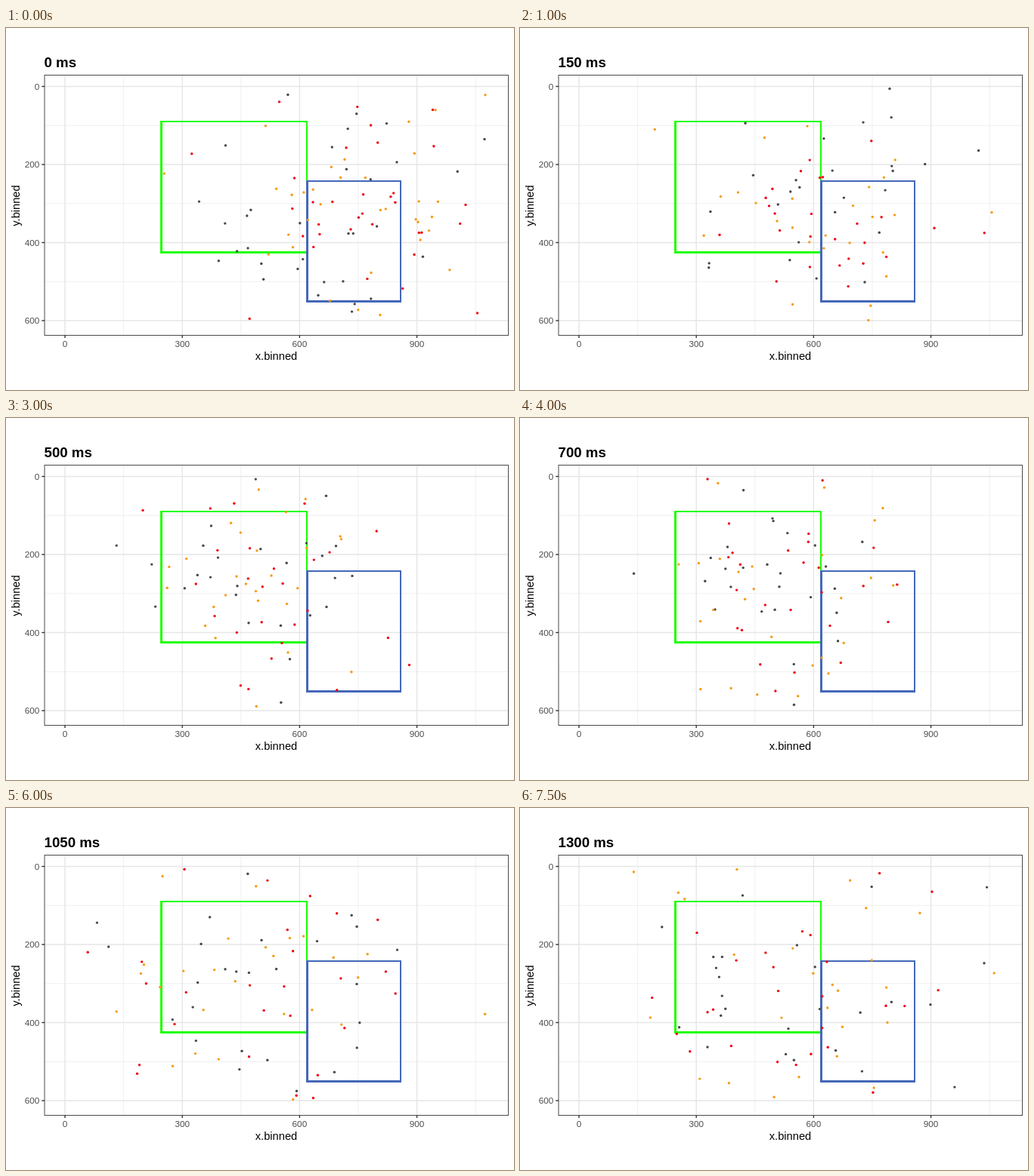
Write an HTML page that moves like this. It is 672x480 px and loops after 8000 ms.

```html
<!DOCTYPE html>
<html lang="en">
<head>
<meta charset="utf-8">
<title>Binned positions over time</title>
<style>
  html, body { margin: 0; width: 100%; height: 100%; overflow: hidden; background: #fff; }
  svg { display: block; font-family: "Liberation Sans", Arial, sans-serif; }
</style>
</head>
<body>
<svg id="plot" width="672" height="480" viewBox="0 0 672 480"></svg>
<script>
const svg = document.getElementById('plot');
const STEPS = 16, STEP_MS = 500;
const PANEL = { left: 51, top: 62.5, right: 664.5, bottom: 407.5 };
const px = v => 78 + v * 0.5173;
const py = v => 77.5 + v * 0.5175;

function make(tag, attrs, text) {
  const el = document.createElementNS('http://www.w3.org/2000/svg', tag);
  for (const key in attrs) el.setAttribute(key, attrs[key]);
  if (text !== undefined) el.textContent = text;
  return svg.appendChild(el);
}

function line(x1, y1, x2, y2, stroke, width) {
  make('line', { x1, y1, x2, y2, stroke, 'stroke-width': width });
}

function label(x, y, size, fill, anchor, text, more) {
  return make('text', { x, y, fill, 'font-size': size, 'text-anchor': anchor, ...more }, text);
}

// Grid
const vertical = (v, color, w) => line(px(v), PANEL.top, px(v), PANEL.bottom, color, w);
const horizontal = (v, color, w) => line(PANEL.left, py(v), PANEL.right, py(v), color, w);
const xTicks = [0, 300, 600, 900], yTicks = [0, 200, 400, 600];
xTicks.forEach(v => vertical(v + 150, '#ebebeb', 0.8));
yTicks.slice(1).forEach(v => horizontal(v - 100, '#ebebeb', 0.8));
xTicks.forEach(v => vertical(v, '#e6e6e6', 1.4));
yTicks.forEach(v => horizontal(v, '#e6e6e6', 1.4));

// Regions: the left and bottom sides are one pixel heavier
function region(left, top, right, bottom, fill) {
  const strip = (x, y, width, height) => make('rect', { x, y, width, height, fill });
  strip(left, top, right - left, 2);
  strip(left, bottom - 3, right - left, 3);
  strip(left, top, 3, bottom - top);
  strip(right - 2, top, 2, bottom - top);
}
region(204, 123, 399, 299, '#1cff00');
region(397, 202, 523, 364, '#4468b8');

const dotLayer = make('g', {});

// Panel border, axes and title
make('rect', {
  x: PANEL.left, y: PANEL.top, width: PANEL.right - PANEL.left,
  height: PANEL.bottom - PANEL.top, fill: 'none', stroke: '#4a4a4a', 'stroke-width': 1
});
for (const v of xTicks) {
  line(px(v), 407.5, px(v), 411, '#333', 1.4);
  label(px(v), 423, 11.73, '#4d4d4d', 'middle', v);
}
for (const v of yTicks) {
  line(47.3, py(v), 51, py(v), '#333', 1.4);
  label(44.3, py(v) + 4.3, 11.73, '#4d4d4d', 'end', v);
}
label(357.5, 440, 14.67, '#000', 'middle', 'x.binned');
label(0, 0, 14.67, '#000', 'middle', 'y.binned', { transform: 'translate(17.5 235.5) rotate(-90)' });
const title = label(50.5, 52, 18.67, '#000', 'start', '0 ms', { 'font-weight': 'bold' });

// Seeded randomness
let seed = 2024;
function random() {
  seed = (seed * 1664525 + 1013904223) % 4294967296;
  return seed / 4294967296;
}
const gauss = () => Math.sqrt(-2 * Math.log(1 - random())) * Math.cos(2 * Math.PI * random());
const fold = (v, lo, hi) => {
  while (v < lo || v > hi) v = v < lo ? 2 * lo - v : 2 * hi - v;
  return v;
};

// The cloud drifts left, tightens, then widens
const cloud = [
  { step: 0, x: 440, spread: 92 },
  { step: 6, x: 348, spread: 82 },
  { step: 12, x: 362, spread: 120 },
  { step: 15, x: 368, spread: 118 }
];
const MID_Y = 237, SPREAD_Y = 82;

function cloudAt(step) {
  const i = Math.max(1, cloud.findIndex(key => key.step >= step));
  const a = cloud[i - 1], b = cloud[i];
  const f = (step - a.step) / (b.step - a.step);
  return { x: a.x + (b.x - a.x) * f, spread: a.spread + (b.spread - a.spread) * f };
}

// Each dot keeps part of its offset from the centre and wanders by the rest
function wander() {
  const path = [];
  let u = gauss(), v = gauss();
  for (let step = 0; step < STEPS; step++) {
    const { x, spread } = cloudAt(step);
    path.push([fold(x + spread * u, 88, 636), fold(MID_Y + SPREAD_Y * v, 79, 391)]);
    u = 0.6 * u + 0.8 * gauss();
    v = 0.6 * v + 0.8 * gauss();
  }
  return path;
}

// Some dots appear only at the start
const PER_COLOR = 33, LASTING = 26;
const dots = [];
for (const fill of ['#474747', '#f89a10', '#f0000c']) {
  for (let i = 0; i < PER_COLOR; i++) {
    const el = make('circle', { r: 1.7, fill });
    dotLayer.appendChild(el);
    dots.push({ el, path: wander(), brief: i >= LASTING });
  }
}

let shown = -1;
function show(step) {
  if (step === shown) return;
  shown = step;
  title.textContent = Math.round(step * 1300 / 15 / 50) * 50 + ' ms';
  for (const { el, path, brief } of dots) {
    const [x, y] = path[step];
    el.setAttribute('cx', x.toFixed(1));
    el.setAttribute('cy', y.toFixed(1));
    el.setAttribute('visibility', brief && step > 0 ? 'hidden' : 'visible');
  }
}

const start = performance.now();
function tick() {
  show(Math.floor((performance.now() - start) / STEP_MS) % STEPS);
  requestAnimationFrame(tick);
}
tick();
</script>
</body>
</html>
```
